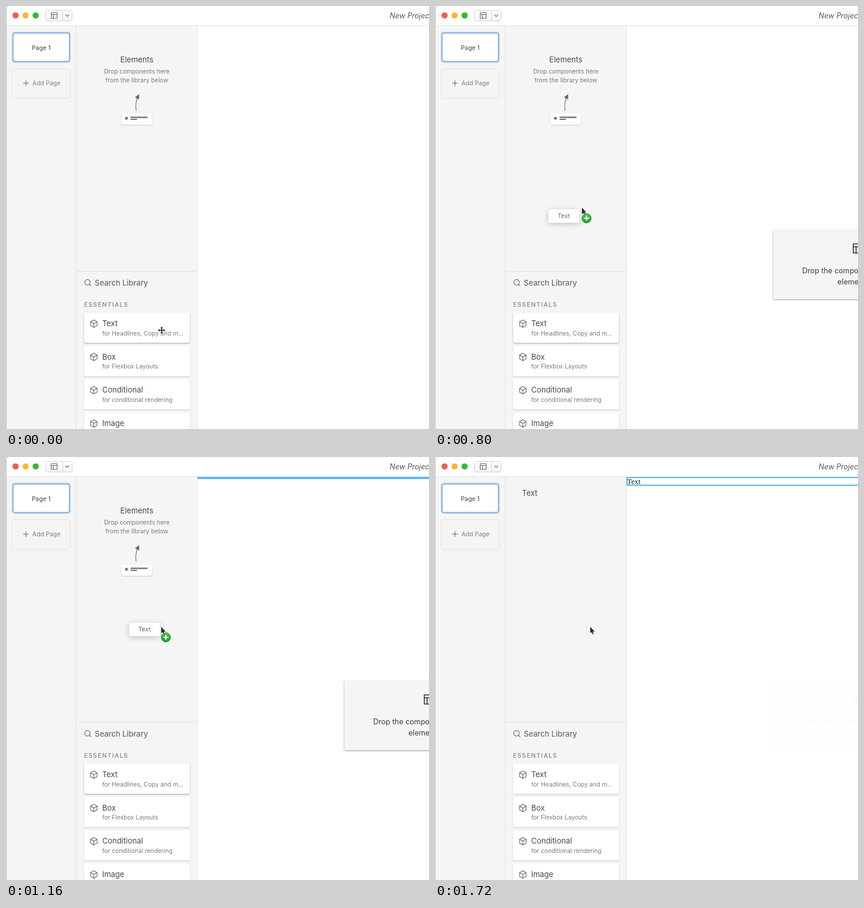
These frames come from a looping animation (720x720 px, 1760 ms). An HTML page:

```html
<!DOCTYPE html>
<html lang="en">
<head>
<meta charset="utf-8">
<style>
  html, body { margin: 0; width: 100%; height: 100%; overflow: hidden; background: #fff; }
  svg { display: block; width: 100vw; height: 100vh; font-family: Inter, sans-serif; }
  .title { font-size: 13px; fill: #484848; }
  .note { font-size: 10.3px; fill: #7b7b7b; }
  .card { fill: #fff; filter: drop-shadow(0 1px 1px rgba(0, 0, 0, .17)); }
  .card.hover { filter: drop-shadow(0 1px 1px rgba(0, 0, 0, .34)); }
  .rule { stroke: #e2e2e2; }
  .line { fill: none; stroke: #666; stroke-width: 1.1; stroke-linejoin: round; stroke-linecap: round; }
  .mid { text-anchor: middle; }
  #chip rect { fill: #fff; filter: drop-shadow(0 2px 5px rgba(0, 0, 0, .22)); }
  #hint rect { fill: #f5f5f5; filter: drop-shadow(0 1px 1.5px rgba(0, 0, 0, .4)); }
  #hint text { font-size: 12.6px; fill: #3c3c3c; }
</style>
</head>
<body>
<svg viewBox="0 0 720 720">
  <defs>
    <linearGradient id="button" x2="0" y2="1">
      <stop stop-color="#fff"/><stop offset="1" stop-color="#f4f4f4"/>
    </linearGradient>
    <linearGradient id="green" x2="0" y2="1">
      <stop stop-color="#55c552"/><stop offset="1" stop-color="#159a1c"/>
    </linearGradient>
    <path id="cube" class="line" d="M0-6.3 5.6-3.2V3.2L0 6.3-5.6 3.2V-3.2ZM-5.6-3.2 0 0 5.6-3.2M0 0V6.3"/>
  </defs>

  <rect width="720" height="720" fill="#fff"/>
  <rect y="34" width="325" height="686" fill="#f5f5f5"/>
  <path class="rule" d="M0 33.5H720M119.5 34V720M325.5 34V720M120 451.5H325"/>
  <path d="M.5 720V4Q.5.5 4 .5" fill="none" stroke="#c4c4c4"/>

  <!-- title bar -->
  <circle cx="16.3" cy="16" r="5.3" fill="#f25a52"/>
  <circle cx="33.4" cy="16" r="5.3" fill="#f8b932"/>
  <circle cx="50.5" cy="16" r="5.3" fill="#36b837"/>
  <rect x="67.5" y="7.5" width="45" height="18" rx="3" fill="url(#button)" stroke="#d2d2d2"/>
  <path d="M96.5 8V25" stroke="#d2d2d2"/>
  <path class="line" d="M77 11.5H87V21H77ZM77 14.5H87M80.5 14.5V21M101.5 15 104.3 17.8 107.1 15"/>
  <text x="653" y="20.5" font-size="12.5" font-style="italic" fill="#555">New Project</text>

  <!-- pages -->
  <rect x="11.5" y="45.5" width="97" height="49.5" rx="4" fill="#fff" stroke="#c3dbf2" stroke-width="3.4"/>
  <rect x="11.8" y="45.8" width="96.4" height="48.9" rx="3.5" fill="none" stroke="#8ab7e4" stroke-width="2"/>
  <text class="mid" x="60" y="74.5" font-size="10.4" fill="#444">Page 1</text>
  <rect x="10.5" y="106.5" width="99" height="50.5" rx="4" fill="none" stroke="#e2e2e2"/>
  <path class="line" d="M29.7 131.3H38.3M34 127V135.6"/>
  <text x="45" y="135.3" font-size="10.4" fill="#808080">Add Page</text>

  <!-- elements panel -->
  <g id="empty">
    <text class="title mid" x="222.7" y="95.7">Elements</text>
    <text class="note mid" x="222.7" y="115">Drop components here</text>
    <text class="note mid" x="222.7" y="130.2">from the library below</text>
    <path class="line" d="M221.5 178Q219.500 166 224 156"/>
    <path d="M226.500 150 219.500 155.500 226.700 159Z" fill="#666"/>
    <rect class="card" x="197" y="183" width="51.5" height="19" rx="2"/>
    <circle cx="205" cy="191" r="2.6" fill="#777"/>
    <path d="M212 188.300H241V190.800H212ZM212 192H223V194H212Z" fill="#777"/>
  </g>
  <text id="added" class="title" x="148" y="66">Text</text>

  <!-- library -->
  <circle class="line" cx="138.700" cy="470.300" r="4.700"/>
  <path class="line" d="M142.200 473.800 144.700 476.300"/>
  <text x="151" y="475.500" font-size="13" font-weight="500" fill="#6c6c6c">Search Library</text>
  <text x="133" y="511.500" font-size="10" font-weight="600" letter-spacing="1.4" fill="#919191">ESSENTIALS</text>
  <g id="library"></g>

  <!-- canvas -->
  <rect id="bar" x="326" y="34" width="394" height="3.500" fill="#50b3f3"/>
  <g id="selection">
    <rect x="327" y="35" width="400" height="13" fill="none" stroke="#62b9ec" stroke-width="2"/>
    <text x="327" y="46" font-size="13" fill="#111" font-family="Liberation Serif, serif">Text</text>
  </g>
  <g id="hint">
    <rect x="576" y="381" width="200" height="118" rx="2"/>
    <path class="line" style="stroke:#333;stroke-width:1.6" d="M712 405H728V420.500H712ZM712 409.700H728M716.700 409.700V420.500"/>
    <text x="625" y="455">Drop the component</text>
    <text x="685" y="474">element</text>
  </g>

  <!-- pointer -->
  <g id="chip">
    <rect width="52.500" height="23" rx="2"/>
    <text class="mid" x="26.200" y="15.300" font-size="10.300" fill="#666">Text</text>
  </g>
  <path id="move" d="M0-6.200 2.300-3.500H.8V-.8H3.500V-2.300L6.200 0 3.500 2.300V.8H.8V3.500H2.300L0 6.200-2.300 3.500H-.8V.8H-3.500V2.300L-6.200 0-3.500-2.300V-.8H-.8V-3.500H-2.300Z"
    fill="#222" stroke="#fff" stroke-width="1.400" paint-order="stroke"/>
  <g id="arrow">
    <path d="M0 0V11.200L2.500 8.900 4.200 12.900 6 12.100 4.300 8.200H7.800Z"
      fill="#2b2b2b" stroke="#fff" stroke-width="1.400" paint-order="stroke"/>
    <g id="badge" transform="translate(8 18)">
      <circle r="8" fill="url(#green)" stroke="#2d8b30" stroke-width=".8"/>
      <path d="M-4.300 0H4.300M0-4.300V4.300" stroke="#fff" stroke-width="2.200"/>
    </g>
  </g>
</svg>
<script>
const LOOP = 1760, TICK = 40, SPACING = 160;
const $ = id => document.getElementById(id);

const components = [
  ["Text", "for Headlines, Copy and m..."],
  ["Box", "for Flexbox Layouts"],
  ["Conditional", "for conditional rendering"],
  ["Image", "for pictures"],
];
$("library").innerHTML = components.map(([name, note], i) => `
  <g transform="translate(133 ${522 + i * 56.6})">
    <rect class="card" width="180" height="51.3" rx="2"/>
    <use href="#cube" x="16.5" y="18.8"/>
    <text class="title" x="30.7" y="23">${name}</text>
    <text class="note" x="30.7" y="38.6">${note}</text>
  </g>`).join("");
const firstCard = document.querySelector("#library .card");

// Positions at equal time steps, joined by a smooth curve.
const pointerPath = [[265, 552], [267, 553], [265, 549], [262.7, 537], [244.7, 449],
  [250, 343.3], [263, 290], [264.2, 289]];
const chipPath = [[198, 528], [193, 346], [208.7, 283], [209.5, 282]];

function along(path, time) {
  const position = Math.max(0, Math.min(time / SPACING, path.length - 1));
  const i = Math.floor(position), u = position - i;
  const at = k => path[Math.max(0, Math.min(k, path.length - 1))];
  return [0, 1].map(axis => {
    const [a, b, c, d] = [-1, 0, 1, 2].map(k => at(i + k)[axis]);
    return b + u / 2 * (c - a + u * (2 * a - 5 * b + 4 * c - d + u * (3 * (b - c) + d - a)));
  });
}

function ramp(time, start, end) {
  const u = Math.max(0, Math.min((time - start) / (end - start), 1));
  return u * u * (3 - 2 * u);
}

const show = (id, visible) => { $(id).style.display = visible ? "" : "none"; };
const place = (id, point) => $(id).setAttribute("transform", `translate(${point})`);

function draw(now) {
  const t = Math.floor(now % LOOP / TICK) * TICK;
  const dropped = t >= 1440;
  const during = (start, end) => t >= start && t < end;

  const pointer = along(pointerPath, t);
  place("move", pointer);
  place("arrow", pointer);
  place("chip", along(chipPath, t - 640));

  show("move", t < 440);
  show("arrow", t >= 440);
  show("chip", during(560, 1200));
  show("badge", during(680, 1200));
  show("bar", during(840, 1440));
  show("empty", !dropped);
  show("added", dropped);
  show("selection", dropped);
  $("hint").style.opacity = ramp(t, 640, 800) - ramp(t, 1440, 1750);
  firstCard.classList.toggle("hover", !dropped);
}

const start = performance.now();
function frame() {
  draw(performance.now() - start);
  requestAnimationFrame(frame);
}
frame();
</script>
</body>
</html>
```
